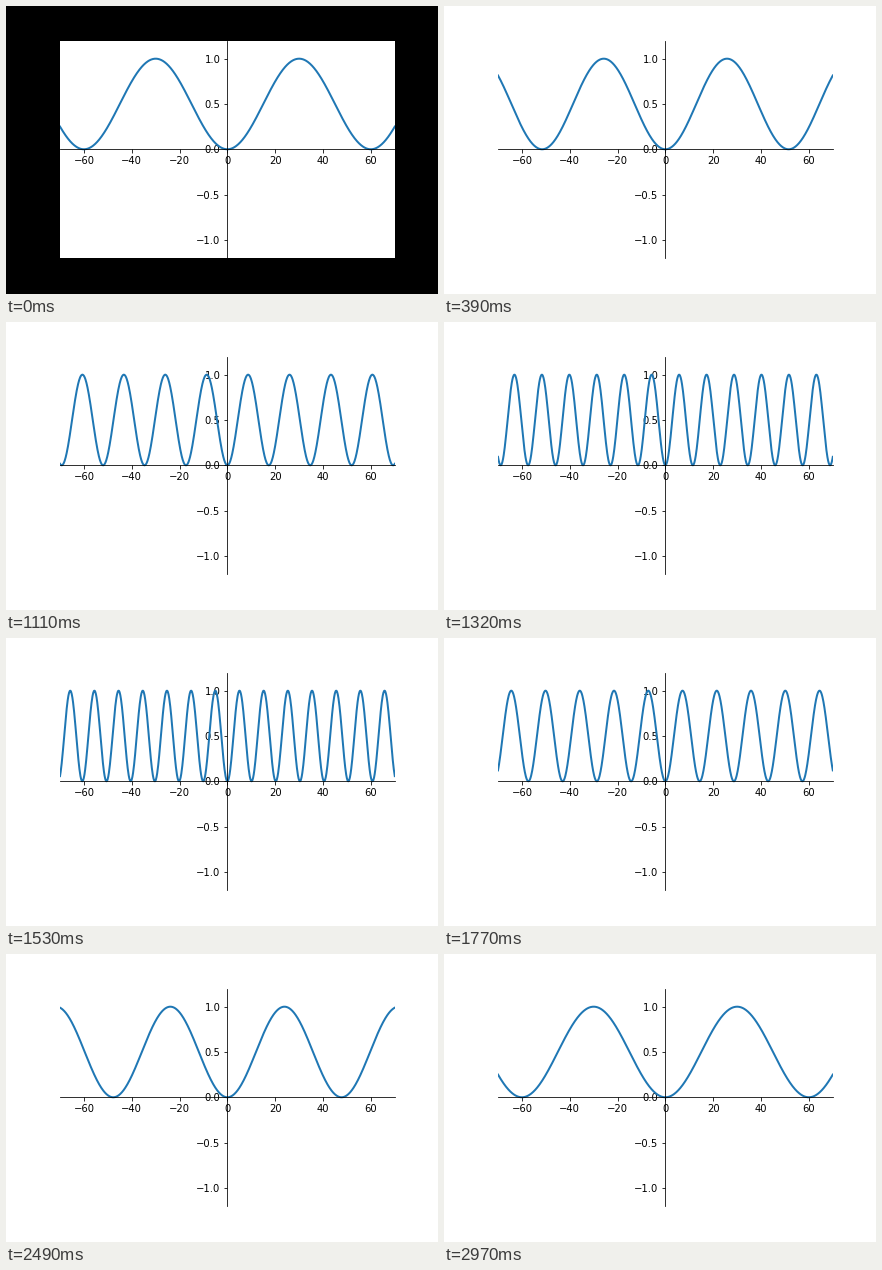
Write a matplotlib script that moves like this. It is 432x288 px and loops after 3 s.

```python
import numpy as np
import matplotlib.pyplot as plt
from matplotlib.animation import FuncAnimation

FRAMES = 100
INTERVAL = 30  # ms

fig = plt.figure(figsize=(6, 4), dpi=72)
ax = fig.add_axes([0.125, 0.125, 0.775, 0.755])
ax.set(xlim=(-70, 70), ylim=(-1.2, 1.2))
ax.set_yticks([-1, -0.5, 0, 0.5, 1])
for side in ("left", "bottom"):
    ax.spines[side].set_position("zero")
for side in ("right", "top"):
    ax.spines[side].set_visible(False)

x = np.linspace(-70, 70, 1000)
line, = ax.plot(x, np.zeros_like(x), lw=2)


def period(i):
    """Swing between 60 and 10 and back over one loop."""
    return 35 + 25 * np.cos(2 * np.pi * (i + 0.5) / FRAMES)


def update(i):
    # The margin is black only for the opening flash.
    fig.set_facecolor("black" if i == 0 else "white")
    line.set_ydata(np.sin(np.pi * x / period(i)) ** 2)
    return line,


anim = FuncAnimation(fig, update, frames=FRAMES, interval=INTERVAL,
                     repeat=True, repeat_delay=0, blit=False)
plt.show()
```
